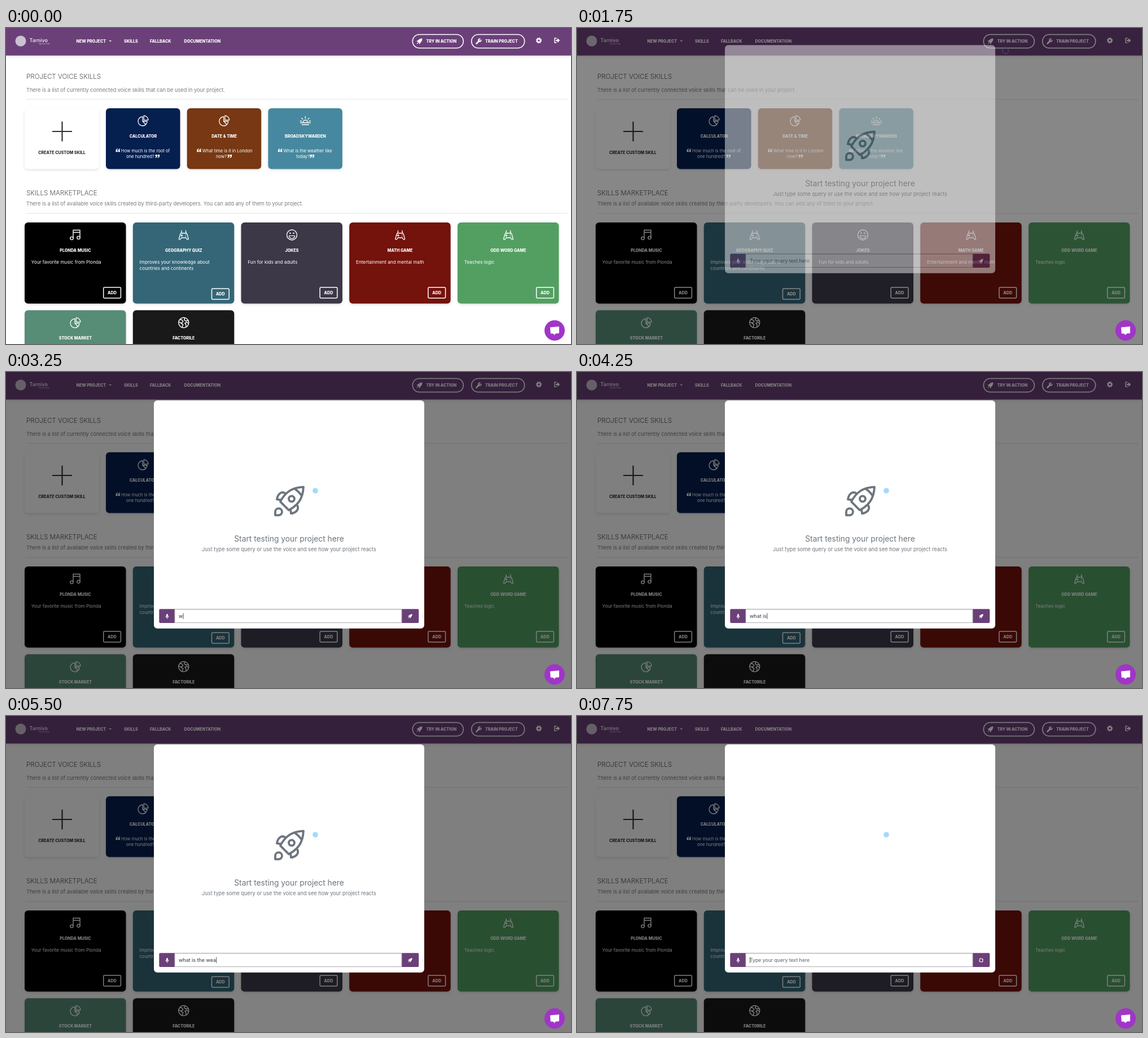
An HTML page that plays this animation: 1001x559 px, repeating every 8000 ms.

```html
<!DOCTYPE html>
<html lang="en">
<head>
<meta charset="utf-8">
<title>Voice skills console</title>
<style>
  html, body { margin: 0; width: 100%; height: 100%; overflow: hidden; background: #fff; }
  svg { display: block; width: 100vw; height: 100vh; font-family: Inter, sans-serif; }
  text { white-space: pre; }
  .line { fill: none; stroke: #fff; stroke-width: 1.4; stroke-linecap: round; stroke-linejoin: round; }
  .card { filter: drop-shadow(0 2px 2px rgba(0, 0, 0, .11)); }
</style>
</head>
<body>
<svg id="stage" viewBox="0 0 1001 559"></svg>
<script>
const STEP = 250, STEPS = 32;
const PURPLE = '#6b4079', GREY = '#6c757d';
const QUERY = 'what is the weather like today';

const text = (x, y, str, size, { weight = 400, fill = '#fff', anchor = 'start', id = '' } = {}) =>
  `<text ${id && `id="${id}"`} x="${x}" y="${y}" font-size="${size}" font-weight="${weight}" fill="${fill}" text-anchor="${anchor}">${str}</text>`;
const caps = (x, y, str, anchor = 'start', fill = '#fff') =>
  text(x, y, str, 7.15, { weight: 800, anchor, fill });
const box = (x, y, w, h, r, fill, extra = '') =>
  `<rect x="${x}" y="${y}" width="${w}" height="${h}" rx="${r}" fill="${fill}" ${extra}/>`;
const at = (x, y, body, extra = '') => `<g transform="translate(${x} ${y}) ${extra}">${body}</g>`;
const line = (d, width = 1.4) => `<path class="line" d="${d}" style="stroke-width:${width}"/>`;
const solid = (d, fill = '#fff') => `<path d="${d}" fill="${fill}"/>`;

const icons = {
  pie: line('M-1-7A8 8 0 1 0 4.7 6.7L-1 1ZM4.7 6.7A8 8 0 0 0 7 1H-1M1.2-9V-1.2H9A8 8 0 0 0 1.2-9Z', 1.3),
  sunrise: line('M-9 3.5H9M-6 7H6M-4.5 3.5A4.5 4.5 0 0 1 4.5 3.5M0-7.5V-4M-6.5-4.5L-4.6-2.6M6.5-4.5L4.6-2.6M-9 .5H-7M9 .5H7', 1.3),
  music: line('M-4 5V-8.5H8V4M-4-4.5H8') +
    '<g class="line"><circle cx="-6.5" cy="6" r="2.6"/><circle cx="5.5" cy="5" r="2.6"/></g>',
  game: line('M-8.5 7.5L-6-1.5Q-5.5-3-4-3H4Q5.5-3 6-1.5L8.5 7.5Q6 9.5 4 5H-4Q-6 9.5-8.5 7.5ZM-4.5-3L-3.5-7.5M4.5-3L3.5-7.5M-5 1H-2M-3.5-.5V2.5M3.5-.3V-.2M3.5 2.3V2.4', 1.3),
  smile: '<circle class="line" r="9"/>' + line('M-5 1.5H5A5 5 0 0 1-5 1.5Z', 1.2) +
    '<g fill="#fff"><circle cx="-3" cy="-3" r="1.2"/><circle cx="3" cy="-3" r="1.2"/></g>',
  globe: '<circle class="line" r="9"/>' + line('M-7-5.5L-3-5-1-2-4 1-5 0-8.5-1M-5 1L-1 3-3 8.5M2-8.5L1-5 4-3 8-4M8.5 1L5-1 2 1 4 3 4 7'),
};

const smallRocket = fill => solid('M5-5C1-5-1-3.5-3-1.2L-5.5-.5L-3 1L-1 3L.5 5.5L1.2 3C3.5 1 5-1 5-5ZM-3.4 2L-5 5L-2 3.4Z', fill);
const wrench = line('M-4 4L1-1', 2.6) + line('M4.2-2.2A2.4 2.4 0 1 1 2.2-4.2', 1.8);
const gear = '<g fill="none" stroke="#fff"><circle r="2.9" stroke-width="2.2"/><circle r="4.4" stroke-width="1.6" stroke-dasharray="1.9 1.56"/></g>';
const logout = line('M-1-4H-4V4H-1') + solid('M-2-1.2H1V-4L5.3 0L1 4V1.2H-2Z');

const quoteMark = (x, y, turned) => {
  const half = 'M3.4 0C1.2.4 0 1.8 0 4V6H3.2V3H1.8C1.8 2 2.4 1.6 3.4 1.4Z';
  return at(x, y, solid(half) + at(4.2, 0, solid(half)), turned ? 'rotate(180 3.8 3)' : '');
};

const skillCard = (x, fill, icon, name, lines, second, closing) => {
  const mid = x + 66;
  return box(x, 142, 131.5, 107.5, 6, fill, 'class="card"') + at(mid, 164, icons[icon]) +
    caps(mid, 194, name, 'middle') +
    quoteMark(x + 17.5, 213.3) + text(x + 27, 219.5, lines[0], 7.65) +
    text(second, 230, lines[1], 7.65) + quoteMark(closing, 224, true);
};

const marketCard = (x, y, fill, icon, name, lines = [], addY = 458.7) => {
  const mid = x + 90;
  const add = lines.length ? box(x + 139.7, addY, 30.7, 19, 2, 'none', 'stroke="#fff" stroke-width="1.5"') +
    caps(x + 155, addY + 12.2, 'ADD', 'middle') : '';
  return box(x, y, 179.5, 143.5, 6, fill, 'class="card"') + at(mid, y + 22, icons[icon]) +
    caps(mid, y + 51.8, name, 'middle') +
    lines.map((str, i) => text(x + 11.8, y + 72.8 + i * 11.3, str, 8.2)).join('') + add;
};

const section = (y, title, lead, leadY, ruleY) =>
  text(36, y, title, 11.6, { weight: 300, fill: '#505050' }) + text(36, leadY, lead, 9.2, { fill: '#7c7c7c' }) +
  box(36, ruleY, 959, 1, 0, '#e4e4e4');

const navBar =
  box(0, 0, 1001, 48.7, 0, PURPLE, 'class="card"') +
  '<circle cx="26" cy="23" r="9.5" fill="#cbc1d0"/>' +
  text(41.5, 24.5, 'Tarnivo', 9, { weight: 600, fill: '#e6dfe9' }) +
  text(77, 28.5, 'by Oro Lim', 3.6, { anchor: 'end', fill: '#e6dfe9' }) +
  caps(124.5, 26.1, 'NEW PROJECT') + solid('M182.5 22H187L184.7 24.3Z') +
  caps(209, 26.1, 'SKILLS') + caps(255, 26.1, 'FALLBACK') + caps(315.5, 26.1, 'DOCUMENTATION') +
  '<g id="tryButton"></g>' +
  box(824.7, 11.5, 94, 24, 12, 'none', 'stroke="#fff" stroke-width="1.6"') +
  at(837.5, 23.5, wrench) + caps(849, 26.1, 'TRAIN PROJECT') +
  at(944, 22, gear) + at(976, 22, logout);

const page =
  box(0, 0, 1001, 559, 0, '#fff') + navBar +
  section(89.6, 'PROJECT VOICE SKILLS', 'There is a list of currently connected voice skills that can be used in your project.', 112.6, 125.5) +
  section(296, 'SKILLS MARKETPLACE', 'There is a list of available voice skills created by third-party developers. You can add any of them to your project.', 314.2, 327.5) +
  box(33, 142, 132, 107.5, 6, '#fff', 'class="card"') +
  '<path d="M82 183H117M99.5 165.5V200.5" stroke="#333" stroke-width="2.2"/>' +
  caps(99, 222.6, 'CREATE CUSTOM SKILL', 'middle', '#333') +
  skillCard(177, '#051f4f', 'pie', 'CALCULATOR', ['How much is the root of', 'one hundred?'], 213, 264.5) +
  skillCard(320.7, '#773813', 'pie', 'DATE &amp; TIME', ['What time is it in London', 'now?'], 372, 392.5) +
  skillCard(464.4, '#46889f', 'sunrise', 'BROADSKYWARDEN', ['What is the weather like', 'today?'], 514, 538.5) +
  marketCard(33, 344, '#000', 'music', 'PLONDA MUSIC', ['Your favorite music from Plonda']) +
  marketCard(224.8, 344, '#356677', 'game', 'GEOGRAPHY QUIZ', ['Improves your knowledge about', 'countries and continents'], 461) +
  marketCard(416.5, 344, '#3d3848', 'smile', 'JOKES', ['Fun for kids and adults']) +
  marketCard(608.2, 344, '#74120c', 'game', 'MATH GAME', ['Entertainment and mental math']) +
  marketCard(800, 344, '#539f62', 'game', 'ODD WORD GAME', ['Teaches logic']) +
  marketCard(33, 499.3, '#578c77', 'pie', 'STOCK MARKET') +
  marketCard(224.8, 499.3, '#191919', 'globe', 'FACTORILE');

const bigRocket = at(502, 228.3, `<g fill="none" stroke="${GREY}" stroke-width="3.8" stroke-linejoin="round">
  <path d="M25-25C3-24-8-14-16 1L-1 16C14 8 24-3 25-25ZM-6-13C-14-19-21-12-22-3L-14-2M13 6C19 14 12 21 3 22L2 14M9-22Q17-17 22-9M-25 25V19A6 6 0 1 1-19 25Z"/>
  <circle cx="4" cy="-4" r="5"/></g>`);

const modal =
  box(262, 50.3, 479, 403.4, 6, '#fff') +
  `<g id="intro">${bigRocket}` +
  text(501.5, 300, 'Start testing your project here', 13.8, { fill: GREY, anchor: 'middle' }) +
  text(501.5, 317.3, 'Just type some query or use the voice and see how your project reacts', 9.2, { fill: GREY, anchor: 'middle' }) + '</g>' +
  box(271.3, 419.3, 460, 24.6, 2, PURPLE) +
  box(299, 419.8, 402, 23.6, 0, '#fff', 'stroke="#b5b5b5"') +
  at(285.5, 432, box(-1.5, -4, 3, 5.2, 1.5, '#fff') + line('M-2.5 0A2.5 2.5 0 0 0 2.5 0M0 2.5V4', 1)) +
  text(306, 434.9, 'Type your query text here', 8.6, { weight: 500, fill: GREY, id: 'placeholder' }) +
  text(306, 434.9, '', 8.9, { weight: 500, fill: '#495057', id: 'typed' }) +
  box(306, 426.5, .9, 10.5, 0, '#444', 'id="caret"') +
  `<g id="send">${at(716, 432, smallRocket('#fff'), 'scale(.75)')}</g>` +
  '<circle id="spinner" cx="716" cy="432" r="3.1" fill="none" stroke="#fff" stroke-width="1.3" stroke-dasharray="4.1 .77"/>';

const chat = '<circle cx="972" cy="535" r="18" fill="#a035c8"/>' + solid('M964 529.5L980 528V540L974 540.5L971 543.5L970 540.8L964.8 540.5Z');

const $ = id => document.getElementById(id);
$('stage').innerHTML = page + box(0, 0, 1001, 559, 0, '#000', 'id="backdrop"') +
  `<g id="modal">${modal}</g>${chat}<circle id="pointer"/>`;

const set = (id, attrs) => Object.entries(attrs).forEach(([key, value]) => $(id).setAttribute(key, value));
const show = (id, on) => set(id, { visibility: on ? 'visible' : 'hidden' });

// [step, x, y] stops of the pointer
const path = [[1, 800, 56], [3, 778, 34], [5, 759, 40], [8, 759, 40], [11, 548, 210], [STEPS, 548, 210]];
// [step, letters typed]
const typing = [[12, 0], [15, 4], [16, 6], [18, 8], [19, 9], [20, 11], [22, 15], [24, 19], [29, 30]];

const along = (stops, step) => {
  const next = stops.findIndex(stop => stop[0] > step);
  if (next === 0) return stops[0].slice(1);
  if (next < 0) return stops[stops.length - 1].slice(1);
  const a = stops[next - 1], b = stops[next];
  const k = (step - a[0]) / (b[0] - a[0]);
  return a.slice(1).map((v, i) => v + (b[i + 1] - v) * k);
};

function draw(step) {
  const hover = step >= 3 && step < 7;
  const ink = hover ? '#444' : '#fff';
  $('tryButton').innerHTML = box(720.3, 11.5, 90, 24, 12, hover ? '#fff' : 'none', 'stroke="#fff" stroke-width="1.6"') +
    at(732.5, 23.5, smallRocket(ink)) + caps(744.5, 26.1, 'TRY IN ACTION', 'start', ink);

  const opening = step === 7, sent = step >= 30;
  set('backdrop', { opacity: step < 7 ? 0 : opening ? .47 : .5 });
  set('modal', { opacity: step < 7 ? 0 : opening ? .46 : 1, transform: `translate(0 ${opening ? -20 : 0})` });

  const count = sent ? 0 : Math.round(along(typing, step)[0]);
  $('typed').textContent = QUERY.slice(0, count);
  show('placeholder', !count);
  const blinkOff = !count && !sent && step >= 10 && step < 12;
  show('caret', step >= 8 && !blinkOff);
  set('caret', { x: 306 + (count ? $('typed').getComputedTextLength() + .3 : 0) });
  show('intro', !sent);
  show('send', !sent);
  show('spinner', sent);
  set('spinner', { transform: `rotate(${step * 70} 716 432)` });

  const [cx, cy] = along(path, step), ring = step < 9;
  show('pointer', step >= 1);
  set('pointer', { cx, cy, r: ring ? 5.5 : 4.8, fill: ring ? 'none' : '#a3dafa',
    stroke: ring ? '#544f8c' : 'none', 'stroke-opacity': step === 8 ? .35 : .9 });
}

let shown = -1;
function tick() {
  const step = Math.floor(performance.now() / STEP) % STEPS;
  if (step !== shown) draw(shown = step);
  requestAnimationFrame(tick);
}
tick();
</script>
</body>
</html>
```
